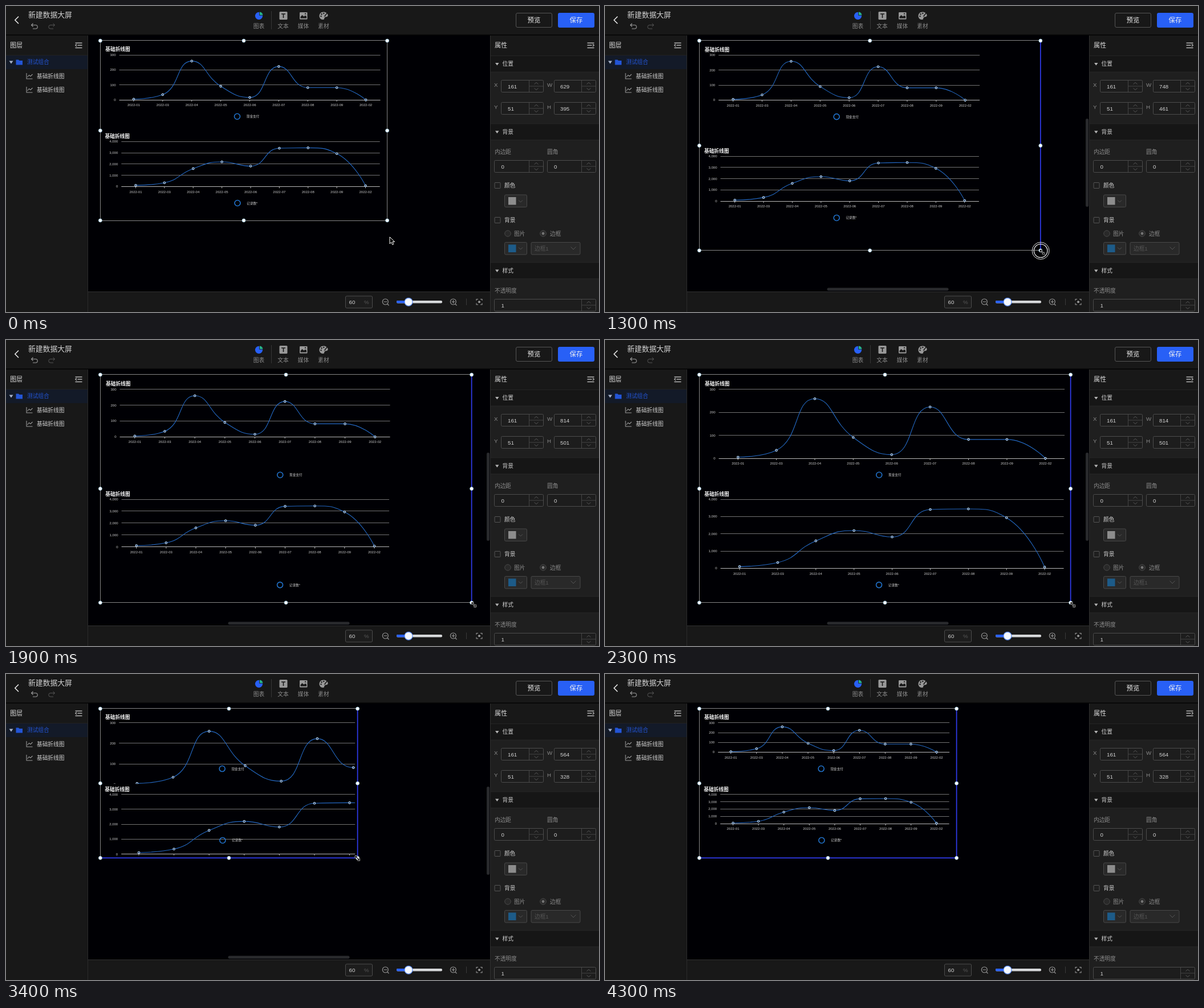
An HTML page that plays this animation: 1040 px wide and 538 px high, repeating every 4.4 s.

```html
<!DOCTYPE html>
<html lang="zh-CN">
<head>
<meta charset="utf-8">
<title>数据大屏</title>
<style>
html, body { margin: 0; width: 100%; height: 100%; overflow: hidden; background: #181818; }
svg { display: block; width: 1040px; height: 538px; }
text { font: 9.7px "Liberation Sans", "Noto Sans CJK SC", "Noto Sans CJK", sans-serif; fill: #d2d2d2; dominant-baseline: central; }
text.big { font-size: 12.8px; }
text.head { font-size: 11px; fill: #dcdcdc; }
text.btn { font-size: 11.4px; fill: #f2f2f2; text-anchor: middle; }
text.mid { text-anchor: middle; fill: #8c8c8c; }
text.grey { fill: #8c8c8c; }
text.dim { fill: #565656; }
text.blue { fill: #2355d6; }
text.title { font-size: 8.7px; font-weight: bold; fill: #f4f4f4; }
text.tick { font-size: 6px; fill: #cfcfcf; }
text.legend { font-size: 5.6px; fill: #cfcfcf; }
.line { fill: none; stroke: #9a9a9a; stroke-width: 1.1; }
.menu { fill: none; stroke: #b4b4b4; stroke-width: 1.4; }
.faint { fill: none; stroke: #555; stroke-width: 1; }
.box { fill: #1d1d1d; stroke: #4c4c4c; }
.off { fill: #292929; stroke: #484848; }
.grid { stroke: #727272; }
.axis { stroke: #b9b9b9; }
.curve { fill: none; stroke: #2468c2; stroke-width: 1.1; }
.dot { fill: #0a1a30; stroke: #b4d4f6; stroke-width: 1.2; }
.handle { fill: #fff; stroke: #a9cfe6; stroke-width: 1; }
.snap { stroke: #303cf0; stroke-width: 1.7; }
</style>
</head>
<body>
<svg viewBox="0 0 1040 538">
  <rect width="1040" height="538" fill="#181818"/>
  <rect x="144" y="51" width="705" height="451" fill="#000004"/>

  <g id="bars" fill="#292a2d">
    <rect x="843" y="198" width="5" height="155" rx="2.5"/>
    <rect x="389.5" y="495.5" width="213" height="5" rx="2.5"/>
  </g>
  <defs>
    <clipPath id="clip0"><rect x="165" y="61"/></clipPath>
    <clipPath id="clip1"><rect x="165"/></clipPath>
  </defs>
  <g id="chart0" clip-path="url(#clip0)"></g>
  <g id="chart1" clip-path="url(#clip1)"></g>
  <g id="frame"></g>

  <!-- header -->
  <path d="M0 51H1040" stroke="#050505" stroke-width="1.5"/>
  <path d="M22 18.5L15.8 24.8 22 31" fill="none" stroke="#eee" stroke-width="1.5"/>
  <text class="big" x="39" y="15">新建数据大屏</text>
  <path class="line" d="M47.5 30.5L44.5 33.5 47.5 36.5M45 33.5H52A3.2 3.2 0 0 1 52 40H47"/>
  <path class="faint" d="M82.5 30.5L85.5 33.5 82.5 36.5M85 33.5H78A3.2 3.2 0 0 0 78 40H83"/>
  <circle cx="443.5" cy="17.3" r="6.6" fill="#2860f5"/>
  <path d="M444.5 16.3V10A6.4 6.4 0 0 1 450.8 16.3Z" fill="#27b58c" stroke="#181818" stroke-width=".8"/>
  <path d="M465.5 9V41" stroke="#363636"/>
  <rect x="479.5" y="10" width="14" height="14" rx="1.5" fill="#999"/>
  <path d="M483 14H490M486.5 14V21" stroke="#181818" stroke-width="1.6"/>
  <rect x="515" y="11" width="13.5" height="12.5" rx="1.2" fill="#999"/>
  <path d="M516.5 21.5V19L519.5 16 522.5 18.5 525 16.5 527 18.5V21.5Z" fill="#181818"/>
  <circle cx="525" cy="13.7" r="1.1" fill="#181818"/>
  <path d="M557 10.5C547 10.5 547.5 24 556 24C559.5 24 557 20.5 560 19.5C563 19 565 18.5 564.5 15.5C563.5 12 560 10.5 557 10.5Z" fill="#999"/>
  <path d="M558.5 18.5L564.5 10.5" stroke="#181818" stroke-width="1.6"/>
  <g fill="#181818"><circle cx="552.5" cy="18" r="1.2"/><circle cx="553.5" cy="14.3" r="1.2"/><circle cx="557.3" cy="13" r="1.2"/></g>
  <text class="mid" x="443.5" y="35">图表</text>
  <text class="mid" x="486" y="35">文本</text>
  <text class="mid" x="521.5" y="35">媒体</text>
  <text class="mid" x="557" y="35">素材</text>
  <rect x="894.5" y="12.5" width="63" height="25" rx="2.5" fill="none" stroke="#555"/>
  <rect x="968" y="12" width="64" height="26" rx="3" fill="#2860f6"/>
  <text class="btn" x="926" y="25">预览</text>
  <text class="btn" x="1000" y="25">保存</text>

  <!-- layers -->
  <path d="M143.5 52V538M0 87H144" fill="none" stroke="#2b2b2b"/>
  <text class="head" x="7" y="69">图层</text>
  <path class="menu" d="M121.5 65H133.5M125.5 69H133.5M121.5 73.5H133.5M124 67L121.8 69 124 71"/>
  <rect y="87" width="143" height="24" fill="#131a28"/>
  <path d="M5.5 96.5H12.5L9 101.5Z" fill="#a8b4cc"/>
  <path d="M17.5 94.5H22L23.5 96H29V103.5H17.5Z" fill="#2355d6"/>
  <text class="blue" x="37" y="98.5">测试组合</text>
  <path class="line" d="M36 118V128H46.5M37.5 125L40.5 121.5 43 123.5 46.5 120"/>
  <path class="line" d="M36 142V152H46.5M37.5 149L40.5 145.5 43 147.5 46.5 144"/>
  <text x="54" y="123">基础折线图</text>
  <text x="54" y="147">基础折线图</text>

  <!-- zoom bar -->
  <path d="M144 502.5H849" stroke="#303030"/>
  <rect class="box" x="595.5" y="510" width="47" height="21" rx="2"/>
  <text x="601.5" y="520.5">60</text>
  <text class="dim" x="628" y="520.5">%</text>
  <path class="line" d="M662.5 520H668.5M669 524L671.5 526.5M781.5 520H787.5M784.5 517V523M788 524L790.5 526.5"/>
  <circle class="line" cx="665.3" cy="520" r="5"/>
  <circle class="line" cx="784.3" cy="520" r="5"/>
  <rect x="685" y="518" width="80" height="4.6" rx="2" fill="#d6d8da"/>
  <rect x="685" y="518" width="22" height="4.6" rx="2" fill="#2860f6"/>
  <circle cx="706" cy="520.3" r="7" fill="#f4f8ff" stroke="#5b8bf5" stroke-width="1.2"/>
  <path d="M807.5 514.5V526" stroke="#3a3a3a"/>
  <path class="line" d="M825 518V515.5H828M832 515.5H835V518M835 522.5V525H832M828 525H825V522.5"/>
  <circle cx="830" cy="520.3" r="2" fill="#9a9a9a"/>

  <!-- properties -->
  <path d="M849.5 52V538" stroke="#303030"/>
  <rect x="850" y="116" width="190" height="422" fill="#1f1f1f"/>
  <text class="head" x="857" y="69">属性</text>
  <path class="menu" d="M1019.5 65H1031.5M1019.5 69H1027.5M1019.5 73.5H1031.5M1029 67L1031.2 69 1029 71"/>
  <g id="props"></g>
  <text class="grey" x="857" y="256">内边距</text>
  <text class="grey" x="949" y="256">圆角</text>
  <rect class="faint" x="857" y="310.5" width="10" height="10" rx="1"/>
  <text x="874" y="315">颜色</text>
  <rect class="off" x="874.5" y="332" width="39" height="21.5" rx="2"/>
  <rect x="881" y="336" width="13.5" height="13.5" fill="#8d8d8d"/>
  <rect class="faint" x="857" y="371.5" width="10" height="10" rx="1"/>
  <text x="874" y="376">背景</text>
  <g class="off"><circle cx="880" cy="400" r="5.3"/><circle cx="942" cy="400" r="5.3"/></g>
  <circle cx="942" cy="400" r="2.4" fill="#747474"/>
  <text class="grey" x="891" y="400">图片</text>
  <text class="grey" x="954" y="400">边框</text>
  <rect class="off" x="874.5" y="415.5" width="39" height="21.5" rx="2"/>
  <rect x="881" y="419.5" width="13.5" height="13.5" fill="#1d5b88"/>
  <rect class="off" x="921" y="415.5" width="86" height="21.5" rx="2"/>
  <text class="dim" x="927" y="426">边框1</text>
  <path class="faint" d="M899 341.5L902.5 345 906 341.5M899 424.5L902.5 428 906 424.5M990.5 423.5L995 428 999.5 423.5"/>
  <text class="grey" x="857" y="500">不透明度</text>

  <g id="mouse">
    <g id="ring" fill="none" stroke="#e4e4e4"><circle r="15"/><circle r="11.8" stroke-width="1.3"/></g>
    <path id="arrow" d="M0 0V12L2.8 9.4 4.7 13.7 6.8 12.8 4.9 8.6H8.6Z" fill="#000" stroke="#fff" stroke-width="1"/>
    <g id="sizer" transform="translate(2.6 2.4)" fill="none">
      <path d="M-3.4 0V-3.4H0M-3.4-3.4L3.4 3.4M3.4 0V3.4H0" stroke="#eee" stroke-width="2.4"/>
      <path d="M-3.4 0V-3.4H0M-3.4-3.4L3.4 3.4M3.4 0V3.4H0" stroke="#000" stroke-width="1.1"/>
    </g>
  </g>
</svg>
<script>
const $ = id => document.getElementById(id);
const LOOP = 4400, STEP = 100, LEFT = 165.4, TOP = 61, SCALE = .8;
const lerp = (a, b, u) => a + (b - a) * u;
const clamp = u => Math.max(0, Math.min(1, u));
const quad = u => u < .5 ? 2 * u * u : 1 - 2 * (1 - u) ** 2;
const cubic = u => u < .5 ? 4 * u ** 3 : 1 - 4 * (1 - u) ** 3;
const between = (t, a, b) => t >= a && t < b;
const crisp = y => Math.floor(y) + .5;

// rows: [time, a, b], eased from each row to the next
function track(rows, t) {
  let i = 0;
  while (i < rows.length - 2 && t >= rows[i + 1][0]) i++;
  const [p, q] = [rows[i], rows[i + 1]];
  const u = quad(clamp((t - p[0]) / (q[0] - p[0])));
  return [lerp(p[1], q[1], u), lerp(p[2], q[2], u)];
}
const SIZE = [[1000, 629, 395], [1500, 804, 493], [1700, 814, 501], [2550, 814, 501], [3187, 564, 328]];
const MOUSE = [[0, 673, 406], [600, 669.7, 378], [1000, 669.7, 378], [1500, 808.5, 455],
  [1700, 817.7, 462.7], [2500, 817.7, 462.7], [3150, 613.7, 321.5]];

const MONTHS = ['01', '03', '04', '05', '06', '07', '08', '09', '02'];
const CHARTS = [
  { left: 198.5, trim: 0, slide: 1, max: 300, ticks: 3, start: 3220, name: '现金支付', legend: 22,
    data: [5, 35, 259, 91, 16, 223, 82, 82, 0] },
  { left: 202.3, trim: 4.6, slide: .3, max: 4000, ticks: 4, start: 3205, name: '记录数*', legend: 23,
    data: [99, 335, 1590, 2190, 1815, 3407, 3440, 2930, 66] }
];
const PLOTS = [[458, 79], [606.5, 121.4], [406, 51.5]];

// smooth curve whose control points stay between neighbouring points
function curve(pts) {
  const hold = (v, a, b) => Math.min(Math.max(v, Math.min(a, b)), Math.max(a, b));
  let d = `M${pts[0]}`, out = pts[0];
  for (let i = 1; i < pts.length; i++) {
    const p = pts[i], prev = pts[i - 1], next = pts[i + 1];
    let into = p, leave = p;
    if (next) {
      const a = Math.hypot(p[0] - prev[0], p[1] - prev[1]);
      const b = Math.hypot(next[0] - p[0], next[1] - p[1]);
      const fwd = p.map((v, k) => hold(v + (next[k] - prev[k]) * .5 * b / (a + b), v, next[k]));
      into = p.map((v, k) => hold(v - (fwd[k] - v) * a / b, v, prev[k]));
      leave = p.map((v, k) => v + (v - into[k]) * b / a);
    }
    d += `C${out} ${into} ${p}`;
    out = leave;
  }
  return d;
}

function plot(c, t) {
  const mix = (a, b, u) => a.map((v, i) => lerp(v, b[i], u));
  if (t < c.start) return mix(PLOTS[0], PLOTS[1], cubic(clamp((t - 1750) / 500)));
  return mix(PLOTS[1], PLOTS[2], cubic(clamp((t - c.start) / 500)));
}

function drawChart(n, t, w, half) {
  const c = CHARTS[n], k = (w - 503.2) / 148;
  const [pw, h] = plot(c, t), [finalW, finalH] = PLOTS[t < 1750 ? 0 : t < c.start ? 1 : 2];
  const l = c.left + c.slide * k, r = l + pw - c.trim;
  const top = n ? half + 19.3 - .7 * k : 86.05 + .6 * k, base = top + h;
  const step = (r - l) / 9;
  let s = '';
  for (let i = 0; i <= c.ticks; i++) {
    const y = base - h * i / c.ticks, v = c.max / c.ticks * i;
    s += `<path class="${i ? 'grid' : 'axis'}" d="M${l} ${crisp(y)}H${r}"/>
      <text class="tick" text-anchor="end" x="${l - 6}" y="${y}">${v.toLocaleString('en-US')}</text>`;
  }
  const pts = c.data.map((v, i) => [l + step * (i + .5), base - h * v / c.max]);
  pts.forEach(([x], i) => {
    s += `<path class="axis" d="M${x} ${base}v3"/>
      <text class="tick" text-anchor="middle" x="${x}" y="${base + 9.2}">2022-${MONTHS[i]}</text>`;
  });
  s += `<path class="curve" d="${curve(pts)}"/>`;
  for (const [x, y] of pts) s += `<circle class="dot" cx="${x}" cy="${y}" r="1.7"/>`;
  const lx = l + (finalW - c.trim) / 2 - c.legend, ly = top + finalH + 29.2;
  s += `<circle cx="${lx}" cy="${ly}" r="5" fill="none" stroke="#2272cc" stroke-width="1.6"/>
    <text class="legend" x="${lx + 16.3}" y="${ly}">${c.name}</text>
    <text class="title" x="${(n ? 173.5 : 174.3) + .7 * k}" y="${n ? half + 10.4 - k : 76.2 + .6 * k}">基础折线图</text>`;
  $('chart' + n).innerHTML = s;
}

function drawFrame(t, x, y) {
  const mx = (LEFT + x) / 2, my = (TOP + y) / 2;
  const l = crisp(LEFT), r = crisp(x), top = TOP - .5, b = crisp(y);
  let s = `<path d="M${l} ${top}H${r}V${b}H${l}Z" fill="none" stroke="#858585"/>`;
  if (between(t, 1100, 2500) || t >= 3200) s += `<path class="snap" d="M${x} ${top}V${y}"/>`;
  if (t >= 3200) s += `<path class="snap" d="M${l} ${y}H${x}"/>`;
  for (const hx of [LEFT, mx, x])
    for (const hy of [TOP, my, y])
      if (hx !== mx || hy !== my) s += `<circle class="handle" cx="${hx}" cy="${hy}" r="2.9"/>`;
  $('frame').innerHTML = s;
}

function setClip(n, y, right, bottom) {
  const box = $('clip' + n).firstElementChild;
  box.setAttribute('y', y);
  box.setAttribute('width', right - LEFT);
  box.setAttribute('height', bottom - y);
}

function draw(t) {
  const [w, h] = track(SIZE, t).map(Math.floor);
  const x = LEFT + w * SCALE, y = TOP + h * SCALE, half = (TOP + y) / 2;
  setClip(0, TOP, x - 4, half + 1);
  setClip(1, half, x - 4, y - 4.5);
  drawChart(0, t, x - LEFT, half);
  drawChart(1, t, x - LEFT, half);
  drawFrame(t, x, y);
  $('w').textContent = w;
  $('h').textContent = h;
  const [cx, cy] = track(MOUSE, t);
  $('mouse').setAttribute('transform', `translate(${cx} ${cy})`);
  $('mouse').style.opacity = t < 3900 ? 1 : 0;
  $('ring').style.opacity = between(t, 800, 1750) || between(t, 2400, 3200) ? 1 : 0;
  $('arrow').style.opacity = t < 500 ? 1 : 0;
  $('sizer').style.opacity = t < 500 ? 0 : 1;
  $('bars').style.opacity = clamp((t - 100) / 200) * clamp((4200 - t) / 300);
}

function spinner(x, y, w, value, pad, id) {
  const e = x + w, s = e - 26, m = e - 13;
  return `<rect class="box" x="${x + .5}" y="${y + .5}" width="${w - 1}" height="21" rx="2"/>
    <path d="M${s + .5} ${y + 1}v20M${s} ${y + 11}H${e - 1}" fill="none" stroke="#444"/>
    <path class="faint" d="M${m - 3.5} ${y + 7.5}l3.5-3 3.5 3M${m - 3.5} ${y + 14.5}l3.5 3 3.5-3"/>
    <text ${id ? `id="${id}"` : ''} x="${x + pad}" y="${y + 11.5}">${value}</text>`;
}
function section(y, name) {
  return `<rect x="850" y="${y - 14}" width="190" height="28.5" fill="#161616"/>
    <path d="M850 ${y - 14}H1040M850 ${y + 14.5}H1040" stroke="#292929" stroke-width=".8"/>
    <path d="M858 ${y - 1.5}h6.5l-3.2 4.5Z" fill="#b5b5b5"/><text x="870.5" y="${y}">${name}</text>`;
}
const label = (x, y, s) => `<text class="grey" x="${x}" y="${y}">${s}</text>`;
$('props').innerHTML = section(101.5, '位置') + section(221, '背景') + section(465, '样式')
  + label(856, 138.5, 'X') + label(949, 138.5, 'W') + label(856, 177, 'Y') + label(949, 177, 'H')
  + spinner(868, 130, 75, 161, 12) + spinner(961, 130, 74, 629, 11, 'w')
  + spinner(868, 169, 75, 51, 12) + spinner(961, 169, 74, 395, 11, 'h')
  + spinner(856, 271, 87, 0, 12.5) + spinner(949, 271, 86, 0, 12)
  + spinner(856, 515, 179, 1, 12.5);

const begin = performance.now();
let last = -1;
function tick() {
  const t = Math.floor((performance.now() - begin) % LOOP / STEP) * STEP;
  if (t !== last) draw(last = t);
  requestAnimationFrame(tick);
}
tick();
</script>
</body>
</html>
```
